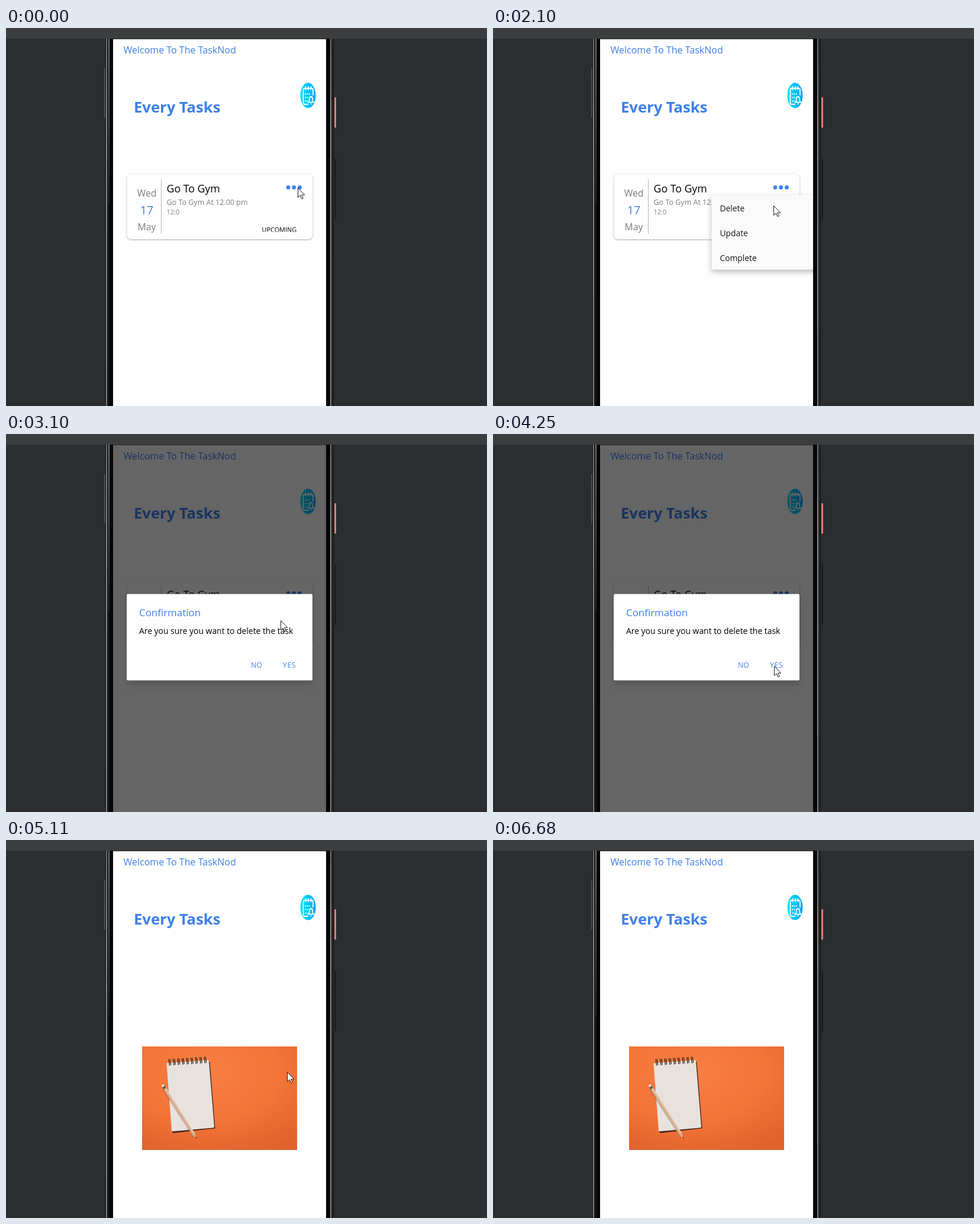
An HTML page for the animation above (7.14 s loop, 813 by 639 pixels).

```html
<!DOCTYPE html>
<html lang="en">
<head>
<meta charset="utf-8">
<title>Task list</title>
<style>
  html, body { margin: 0; width: 100%; height: 100%; overflow: hidden; background: #2c2d2f; }
  svg { display: block; font-family: "Open Sans", "Noto Sans", sans-serif; }
  .blue { fill: #3f80e9; }
  .grey { fill: #7c7c7c; }
  .strong { font-weight: 700; }
  .mid { text-anchor: middle; }
  #card rect { filter: drop-shadow(0 1.5px 1.5px #0005); }
  #menu .sheet { filter: drop-shadow(0 4px 5px #0004); }
  #dialog .sheet { filter: drop-shadow(0 7px 6px #0002); }
</style>
</head>
<body>
<svg width="813" height="639" viewBox="0 0 813 639">
  <defs>
    <linearGradient id="cyan"><stop stop-color="#00e6ee"/><stop offset="1" stop-color="#00a2ff"/></linearGradient>
    <radialGradient id="orange" cx=".42" cy=".25" r=".85">
      <stop stop-color="#f87f44"/><stop offset=".55" stop-color="#f37437"/><stop offset="1" stop-color="#e0622d"/>
    </radialGradient>
    <linearGradient id="metal" x2="0" y2="1">
      <stop stop-color="#707070"/><stop offset=".25" stop-color="#8c8c8c"/><stop offset="1" stop-color="#808080"/>
    </linearGradient>
    <linearGradient id="glint" x2="0" y2="1"><stop stop-color="#777"/><stop offset="1" stop-color="#222"/></linearGradient>
    <clipPath id="screen"><path d="M181 19H541V639H181Z"/></clipPath>
    <clipPath id="row"><path d="M369 283H541V324.500H369Z"/></clipPath>
    <clipPath id="label"><path d="M425 330H500V344.500H425Z"/></clipPath>
  </defs>

  <rect width="813" height="639" fill="#2c2d2f"/>
  <rect width="813" height="18" fill="#3c3d3f"/>

  <g id="phone">
    <path d="M168 18H181V639H168ZM541 18H554V639H541Z" fill="#141414"/>
    <path d="M169 18h2V639h-2ZM548 18h2V639h-2Z" fill="url(#metal)"/>
    <path d="M173 18h2V300h-2Z" fill="url(#glint)"/>
    <path d="M551.500 18h1V639h-1Z" fill="#3d3d3d"/>
    <path d="M175 18h6V639h-6ZM541 18h6V639h-6Z" fill="#060606"/>
    <path d="M166 68h1.500V151h-1.500Z" fill="#555"/>
    <rect x="555" y="117" width="3" height="51.500" rx="1" fill="#d6806f"/>
    <rect x="555.500" y="221" width="2.500" height="102" rx="1" fill="#1c1c1d"/>
  </g>

  <g clip-path="url(#screen)">
    <rect x="181" y="19" width="360" height="620" fill="#fefefe"/>
    <text class="blue" x="198.500" y="43.300" font-size="16">Welcome To The TaskNod</text>
    <text class="blue strong" x="216" y="143" font-size="25.600">Every Tasks</text>

    <ellipse cx="510.500" cy="114" rx="13" ry="21.500" fill="url(#cyan)"/>
    <g fill="none" stroke="#fff" stroke-width="1.800">
      <path d="M511 129H505Q502.500 129 502.500 126V104.500Q502.500 102 505 102H516.500Q519 102 519 104.500V114"/>
      <path d="M506.500 98.500V105M511 98.500V105M515.500 98.500V105"/>
      <path d="M505.500 111.500H514M505.500 117.500H511M505.500 123.500H510" stroke-dasharray="2 1.200"/>
      <path d="M511 125.500Q513 123.500 513 119.500Q513 116 515.500 116T518 119.500Q518 123.500 520 125.500ZM514.500 128.300H516.500"/>
    </g>

    <g id="photo">
      <rect x="230" y="349" width="262" height="175" fill="url(#orange)"/>
      <path d="M273 381 344 375 353 487 282 495Z" fill="#4a2418" stroke="#4a2418" stroke-width="1" stroke-linejoin="round"/>
      <path d="M273.500 379 341 374 350 484.500 282 490.500Z" fill="#e8e2df" stroke="#e8e2df" stroke-width="4" stroke-linejoin="round"/>
      <g id="rings" stroke="#30241f" stroke-width="1.300" fill="none"></g>
      <path d="M266 420 318 501" stroke="#7b4a35" stroke-opacity=".35" stroke-width="5"/>
      <path d="M267 418 317.500 498" stroke="#d5b092" stroke-width="5"/>
      <path d="M268.500 417 319 497" stroke="#e9cfb9" stroke-width="1.500"/>
      <path d="M315.400 499.300 319.600 496.700 322.500 505.500Z" fill="#d9ad87"/>
      <path d="M320 502.500 321.700 501.500 322.700 505.500Z" fill="#42241c"/>
      <path d="M264.500 414 268.500 420.300" stroke="#685a55" stroke-width="5"/>
      <path d="M264.300 413.700 266.200 416.800" stroke="#eee5e0" stroke-width="4.500"/>
    </g>

    <g id="card">
      <rect x="204.500" y="247" width="313.500" height="110" rx="7" fill="#fefefe"/>
      <path d="M262.500 256V348" stroke="#b5b5b5"/>
      <g class="mid">
        <text class="grey" x="238" y="285" font-size="15.700">Wed</text>
        <text class="blue" x="238" y="315" font-size="19.500">17</text>
        <text class="grey" x="238" y="342" font-size="15.700">May</text>
      </g>
      <text x="271.500" y="278" font-size="17.700">Go To Gym</text>
      <text class="grey" x="271.500" y="298.700" font-size="12.500">Go To Gym At 12.00 pm</text>
      <text class="grey" x="271.500" y="315.300" font-size="11">12:0</text>
      <text x="432.500" y="345" font-size="10.900" clip-path="url(#label)">UPCOMING</text>
      <g class="blue">
        <circle cx="477" cy="269.500" r="3.400"/><circle cx="486.700" cy="269.500" r="3.400"/><circle cx="496.400" cy="269.500" r="3.400"/>
      </g>
    </g>

    <g id="menu" fill="#151515" font-size="13.800">
      <rect class="sheet" x="369.500" y="282.500" width="180" height="126" rx="2" fill="#fafafa"/>
      <circle id="ripple" cx="455" cy="304" fill="#e6e6e6" clip-path="url(#row)"/>
      <text x="383.500" y="310">Delete</text>
      <text x="383.500" y="352">Update</text>
      <text x="383.500" y="394">Complete</text>
    </g>

    <rect id="dim" x="181" y="19" width="360" height="620"/>
    <g id="dialog">
      <rect class="sheet" x="204" y="270.500" width="314" height="146" rx="2" fill="#fefefe"/>
      <text class="blue" x="225" y="308" font-size="16.900">Confirmation</text>
      <text x="225" y="337.500" font-size="13.900">Are you sure you want to delete the task</text>
      <g class="blue" font-size="12.200">
        <text x="414" y="395.300">NO</text>
        <text x="468" y="395.300" letter-spacing=".6">YES</text>
      </g>
    </g>
  </g>

  <path id="cursor" d="M.5.5V16.500L4.300 13 7 18.800 9.300 17.700 6.700 12.200H11.700Z" fill="#fff" stroke="#1c1c28"/>
</svg>
<script>
const LOOP = 7140;
const $ = id => document.getElementById(id);

// Every track holds its value until the next start time: [ms, ...value]
const cursorTrack = [
  [0, 493, 270], [120, 490, 270], [1080, 489, 270],
  [2100, 474, 300], [2230, 468, 308], [2360, 464, 315],
  [3530, 469, 380], [3700, 472, 392], [4130, 474, 392], [4250, 475, 392],
  [6320, 580, 505], [6440, 652, 580], [6560, 686, 612], [6680, -50, -50]
];
const menuTrack = [[0, 0], [1540, .6], [1660, 1], [2970, .98], [3100, 0]];
const rippleTrack = [[0, 0], [2670, 58], [2820, 120], [2970, 0]];
const dimTrack = [[0, 0], [3100, .6], [4960, .335], [5110, 0]];
const dialogTrack = [[0, 0], [3100, 1], [4960, .3], [5110, 0]];
const cardTrack = [[0, 1], [4960, 0]];

const at = (track, t) => track.findLast(step => step[0] <= t).slice(1);
const fade = (id, track, t) => $(id).setAttribute("opacity", at(track, t)[0]);

$("rings").innerHTML = Array.from({ length: 9 }, (_, i) => {
  const x = 275 + i * 7.5, y = 370.500 - i * .5;
  return `<path d="M${x} ${y}l1.500 11M${x + 2.200} ${y}l1.500 10"/>`;
}).join("");

function draw() {
  const t = performance.now() % LOOP;
  fade("menu", menuTrack, t);
  fade("dim", dimTrack, t);
  fade("dialog", dialogTrack, t);
  fade("card", cardTrack, t);
  $("photo").setAttribute("opacity", 1 - at(cardTrack, t)[0]);
  $("ripple").setAttribute("r", at(rippleTrack, t)[0]);
  $("cursor").setAttribute("transform", `translate(${at(cursorTrack, t)})`);
  requestAnimationFrame(draw);
}
draw();
</script>
</body>
</html>
```
